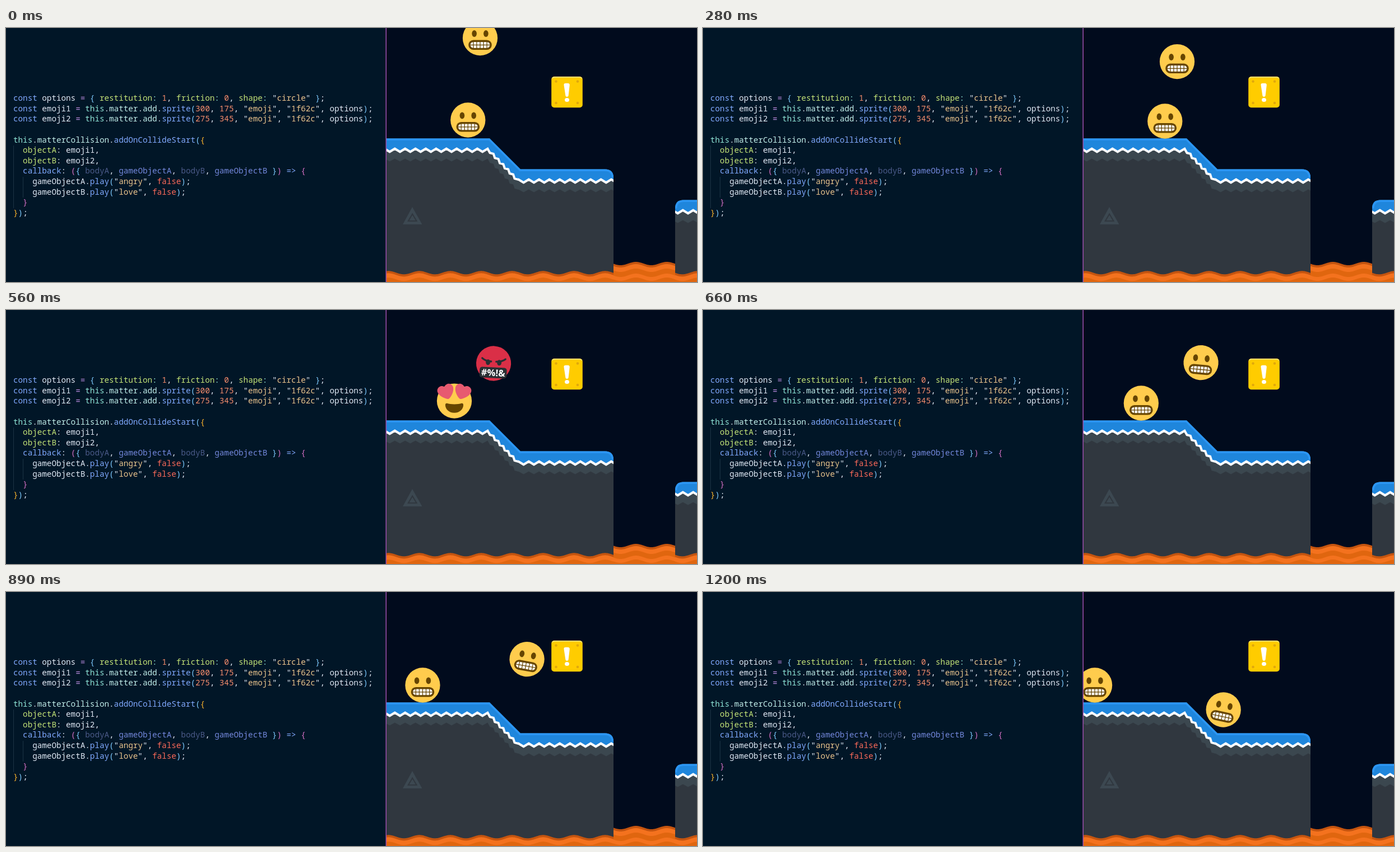
Write an HTML page that moves like this. It is 1233 px wide and 454 px high and loops after 1250 ms.

```html
<!DOCTYPE html>
<html lang="en">
<head>
<meta charset="utf-8">
<title>Emoji collision</title>
<style>
html, body { margin: 0; width: 100%; height: 100%; overflow: hidden; background: #010b1d; }
svg { position: absolute; left: 0; top: 0; display: block; }
pre { position: absolute; left: 13px; top: 116.3px; margin: 0; color: #e2e9f5;
  font: 500 14.25px/18.6px "Noto Sans Mono", "DejaVu Sans Mono", monospace; }
i { font-style: normal; }
.k { color: #82aaff } .o { color: #c792ea } .c { color: #7fcbff } .p { color: #c5e478 }
.n { color: #f78c6c } .s { color: #ecc48d } .t { color: #8fe3d6 } .w { color: #c3eeea }
.g { color: #4b5a88 } .h { color: #7488dc } .y { color: #ffb62c } .m { color: #d670c6 }
.r { color: #ff6a5a }
</style>
</head>
<body>
<svg width="1233" height="454" viewBox="0 0 1233 454">
  <defs>
    <clipPath id="land"><path d="M660 197.400H863L918 252.500H1069Q1084 252.500 1084 267.500V454H660Z"/></clipPath>
    <clipPath id="isle"><path d="M1194 454V322.500Q1194 307.500 1209 307.500H1240V454Z"/></clipPath>
    <g id="calm">
      <circle cx="18" cy="18" r="18" fill="#ffcc4d"/>
      <g fill="#664500">
        <ellipse cx="12" cy="13.4" rx="2.5" ry="3.5"/>
        <ellipse cx="24" cy="13.4" rx="2.5" ry="3.5"/>
        <rect x="6" y="20" width="24" height="10.2" rx="5"/>
      </g>
      <rect x="7.9" y="22" width="20.2" height="6.2" rx="3.1" fill="#fff"/>
      <path d="M7.5 25.1H28.5M11 21.5V29M14.5 21.5V29M18 21.500V29M21.500 21.500V29M25 21.500V29" stroke="#664500" stroke-width=".75"/>
    </g>
    <g id="angry">
      <circle cx="18" cy="18" r="18" fill="#da2f47"/>
      <g fill="#292f33">
        <ellipse cx="12.2" cy="17" rx="2.3" ry="2.9"/>
        <ellipse cx="23.8" cy="17" rx="2.3" ry="2.9"/>
        <rect x="4" y="22" width="28" height="11" rx="2.6"/>
      </g>
      <path d="M6 13Q9 15.8 15.4 16.1M30 13Q27 15.8 20.6 16.1" fill="none" stroke="#292f33" stroke-width="1.9" stroke-linecap="round"/>
      <text x="18" y="31" text-anchor="middle" fill="#fff" font-family="Open Sans, sans-serif" font-weight="700" font-size="9.6">#%!&amp;</text>
    </g>
    <path id="heart" d="M16.65 3.28C15.79.85 13.13-.43 10.69.43c-1.48.52-2.52 1.71-2.93 3.1-1.19-.83-2.75-1.1-4.22-.58C1.11 3.81-.17 6.48.69 8.91c.12.34.28.66.47.96 1.95 3.58 7.59 6.1 11 6.13 2.64-2.17 5.45-7.67 4.72-11.68-.04-.35-.11-.7-.23-1.04z" fill="#e75a70"/>
    <g id="love">
      <circle cx="18" cy="18" r="18" fill="#ffcc4d"/>
      <use href="#heart"/>
      <use href="#heart" transform="matrix(-1 0 0 1 36 0)"/>
      <path d="M18 21.5C15 21.5 12.5 21 10.5 20.5c-1-.2-1.8.2-1.8 1.8 0 4 3.8 8 9.3 8s9.3-4 9.3-8c0-1.6-.8-2-1.8-1.8C23.5 21 21 21.5 18 21.5z" fill="#664500"/>
    </g>
  </defs>

  <rect x="678" width="555" height="454" fill="#010b1d"/>
  <g id="ground"></g>
  <path d="M725 320L742.5 351H708Z" fill="#3c4851"/>
  <path d="M725.2 332.5L732.6 345H717.8Z" fill="none" stroke="#30373f" stroke-width="2"/>
  <g id="lava"></g>

  <rect x="973.2" y="86.800" width="55.600" height="55.400" rx="5" fill="#ffcc00"/>
  <path d="M975 90Q976 87.800 979 87.800H1023Q1026 87.800 1027.500 90" fill="none" stroke="#ffe58a" stroke-width="1.600"/>
  <g fill="#e0a80c">
    <circle cx="981.5" cy="95.5" r="2.3"/><circle cx="1020" cy="95.5" r="2.3"/>
    <circle cx="981.5" cy="134" r="2.3"/><circle cx="1020" cy="134" r="2.3"/>
  </g>
  <g fill="#fff">
    <path d="M995.5 102Q995 99 998.5 98.800H1002.500Q1006 99 1005.800 102L1003.600 121Q1003 123 1001 123Q998.800 123 998.400 121Z"/>
    <ellipse cx="1001" cy="128.500" rx="4" ry="3.500"/>
  </g>

  <use id="low"/>
  <use id="high"/>

  <rect width="678" height="454" fill="#011627"/>
  <rect x="677.500" width="1.500" height="454" fill="#a14fae"/>
  <path d="M13.500 210V322M30.500 266V303" stroke="#1b3344"/>
</svg>
<pre><i class="k">const</i> options <i class="o">=</i> <i class="c">{</i> <i class="p">restitution</i><i class="t">:</i> <i class="n">1</i>, <i class="p">friction</i><i class="t">:</i> <i class="n">0</i>, <i class="p">shape</i><i class="t">:</i> "<i class="s">circle</i>" <i class="c">}</i>;
<i class="k">const</i> emoji1 <i class="o">=</i> <i class="t">this</i>.<i class="w">matter</i>.<i class="w">add</i>.<i class="k">sprite</i><i class="c">(</i><i class="n">300</i>, <i class="n">175</i>, "<i class="s">emoji</i>", "<i class="s">1f62c</i>", options<i class="c">)</i>;
<i class="k">const</i> emoji2 <i class="o">=</i> <i class="t">this</i>.<i class="w">matter</i>.<i class="w">add</i>.<i class="k">sprite</i><i class="c">(</i><i class="n">275</i>, <i class="n">345</i>, "<i class="s">emoji</i>", "<i class="s">1f62c</i>", options<i class="c">)</i>;

<i class="t">this</i>.<i class="w">matterCollision</i>.<i class="k">addOnCollideStart</i><i class="c">(</i><i class="y">{</i>
  <i class="p">objectA</i>: emoji1,
  <i class="p">objectB</i>: emoji2,
  <i class="k">callback</i>: <i class="m">(</i><i class="c">{</i> <i class="g">bodyA</i>, <i class="h">gameObjectA</i>, <i class="g">bodyB</i>, <i class="h">gameObjectB</i> <i class="c">}</i><i class="m">)</i> <i class="k">=&gt;</i> <i class="m">{</i>
    gameObjectA.<i class="k">play</i><i class="c">(</i>"<i class="s">angry</i>", <i class="r">false</i><i class="c">)</i>;
    gameObjectB.<i class="k">play</i><i class="c">(</i>"<i class="s">love</i>", <i class="r">false</i><i class="c">)</i>;
  <i class="m">}</i>
<i class="y">}</i><i class="c">)</i>;</pre>
<script>
const el = id => document.getElementById(id);

// Zigzag of n half waves, starting on a peak a quarter wave before x
const zig = (x, y, n, amp) =>
  Array.from({ length: n + 1 }, (_, i) => [x - 4.6 + i * 9.2, y + (i % 2 ? amp : -amp)]);

function landEdge(dy, amp) {
  const stairs = [];
  for (let i = 0; i < 6; i++) {
    const x = 861 + i * 8.8, y = 198 + dy - amp + i * 9.2;
    stairs.push([x + 2.5, y + 7.5], [x + 8.8, y + 9.2]);
  }
  return [...zig(661.6, 198 + dy, 22, amp), ...stairs, ...zig(919, 253 + dy, 19, amp)];
}
const isleEdge = (dy, amp) => zig(1194, 308 + dy, 5, amp);

function snow(clip, edge, rim) {
  const upper = edge(20.5, 2.8), lower = edge(38, 2.4);
  const above = pts => `M${pts[0][0]} 100L${pts.join(" ")}L${pts[pts.length - 1][0]} 100Z`;
  return `<g clip-path="url(#${clip})">
    <rect x="660" width="580" height="454" fill="#30373f"/>
    <path d="${above(lower)}" fill="#3b474f"/>
    <path d="${above(upper)}" fill="#1f86dc"/>
    <polyline points="${upper.join(" ")}" fill="none" stroke="#fff" stroke-width="4"/>
    <path d="${rim}" fill="none" stroke="#2b95f3" stroke-width="7"/></g>`;
}
el("ground").innerHTML =
  snow("land", landEdge, "M660 197.4H863L918 252.5H1069Q1084 252.5 1084 267.5") +
  snow("isle", isleEdge, "M1194 322.5Q1194 307.5 1209 307.5H1240");

function wave(x0, x1, y, amp) {
  let d = "";
  for (let x = x0; x <= x1; x++)
    d += `${d ? "L" : "M"}${x} ${(y - amp * Math.cos((x - 1124) / 55.2 * 2 * Math.PI)).toFixed(1)}`;
  return d;
}
function lava(x0, x1, y) {
  const fill = (dy, color) =>
    `<path d="${wave(x0, x1, y + dy, 3)}V454H${x0}Z" fill="${color}"/>`;
  return fill(0, "#c4540f") + fill(4, "#f4721e") +
    fill(12, "#e0660f") + fill(21, "#f4721e") + fill(28, "#e0660f");
}
el("lava").innerHTML = lava(679, 1084, 437.3) + lava(1084, 1194, 421) + lava(1194, 1233, 437.3);

const HIT = 433, BOUNCE = 963, CALM = 585, LOOP = 1250, FALL = 0.0003845;
const starts = [0, 50, 100, 150, 200, 230, 280, 330, 360, 410, 460, 510, 560, 610,
  660, 690, 740, 790, 840, 890, 920, 970, 1020, 1070, 1120, 1150, 1200];

// Each pose is [x, y, angle]
function highPose(t) {
  if (t < HIT) return [846, 18 + 0.0424 * t + FALL * t * t, 0];
  const d = t - HIT, b = t - BOUNCE;
  if (b < 0) return [846 + 0.192 * d - 0.00002 * d * d, 108.35 - 0.15 * d + FALL * d * d, 0.0228 * d];
  return [942 - 0.08 * b + 0.0001 * b * b, 138.5 + 0.2734 * b + 0.000128 * b * b, 12];
}
function lowPose(t) {
  if (t < HIT) return [824.3, Math.min(166.5, 164.5 + 0.0424 * t), 0];
  const d = t - HIT;
  return [824.3 - 0.197 * d + 0.000044 * d * d, 166.5 - Math.max(0, 0.08 * d - FALL * d * d), 0];
}
function place(id, [x, y, angle], face) {
  el(id).setAttribute("href", "#" + face);
  el(id).setAttribute("transform",
    `translate(${x} ${y}) rotate(${angle}) scale(1.73) translate(-18 -18)`);
}
function draw(now) {
  const clock = now % LOOP;
  const t = starts.filter(s => s <= clock).pop();
  const upset = t >= HIT && t < CALM;
  place("high", highPose(t), upset ? "angry" : "calm");
  place("low", lowPose(t), upset ? "love" : "calm");
}
let begin;
function tick(now) {
  begin ??= now;
  draw(Math.max(0, now - begin));
  requestAnimationFrame(tick);
}
draw(0);
requestAnimationFrame(tick);
</script>
</body>
</html>
```
